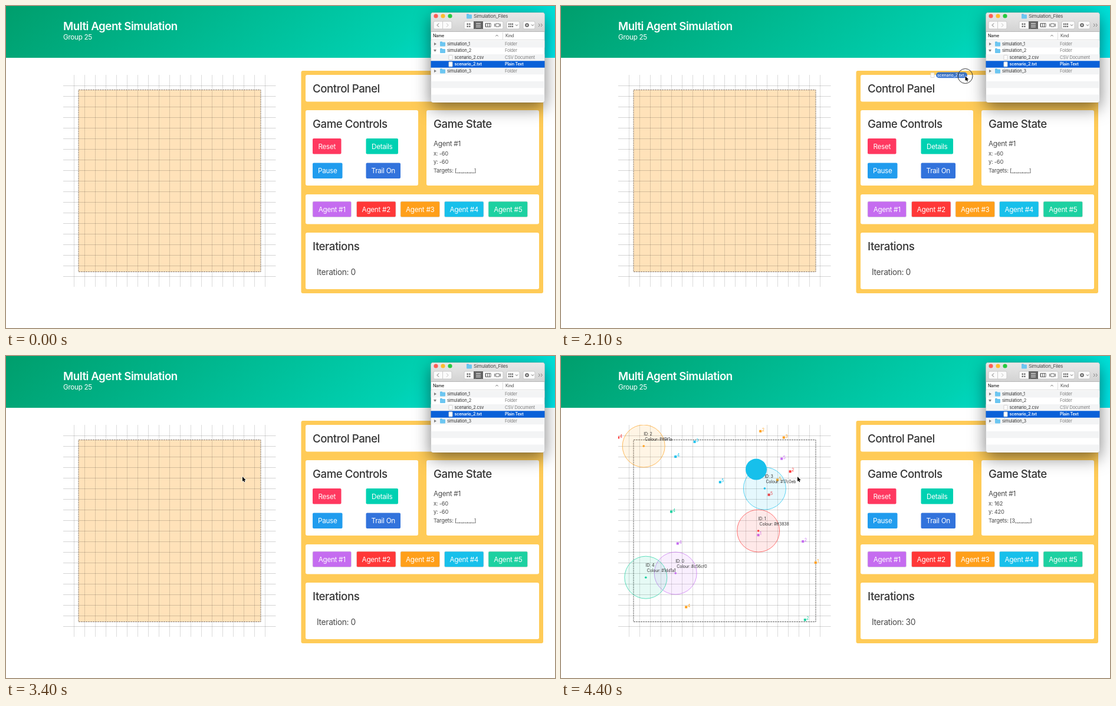
Animation of 931x547 px, one loop 4.5 s. Source, as an HTML page with a canvas:

```html
<!DOCTYPE html>
<html lang="en">
<head>
<meta charset="utf-8">
<title>Multi Agent Simulation</title>
<style>
html, body { margin: 0; width: 100%; height: 100%; overflow: hidden; background: #fff; }
header { position: absolute; width: 931px; height: 88px;
  background: linear-gradient(141deg, #009e6c 0%, #00d1b2 71%, #00e7eb 100%); }
canvas { position: absolute; left: 0; top: 0; }
</style>
</head>
<body>
<header></header>
<canvas id="stage" width="931" height="547"></canvas>
<script>
const ctx = document.getElementById('stage').getContext('2d');
const LOOP = 4500, STEP = 100;
const MAP = { x: 97, y: 117, size: 360, scale: 0.6 };
const RANGE = 60, SPEED = 6;
const COLOURS = ['#c56cf0', '#ff3838', '#ff9f1a', '#17c0eb', '#1dd1a1'];

// start x, start y, row to sweep
const AGENTS = [[60, 342, 420], [576, 300, 300], [192, 24, 60], [594, 180, 180], [258, 432, 420]];
// number, x, y for each agent
const TARGETS = [
  [[1, 396, 312], [2, 522, 330], [4, 168, 336], [5, 462, 96]],
  [[2, 486, 132], [3, 414, 330], [4, 0, 36], [5, 426, 198]],
  [[1, 558, 390], [2, 402, 18], [3, 468, 36], [4, 192, 516], [5, 450, 156]],
  [[1, 390, 126], [3, 216, 48], [4, 162, 90], [5, 288, 162]],
  [[1, 72, 390], [2, 528, 552], [4, 150, 246]]
];
// time, x, y of the pointer
const POINTER = [[400, 906, 172], [800, 855, 104], [1300, 853, 98], [1700, 814, 99],
  [2600, 525, 144], [3200, 401, 205], [4500, 401, 205]];

function text(str, x, y, size, colour, weight = 400, align = 'left') {
  ctx.font = `${weight} ${size}px Inter, Roboto, sans-serif`;
  ctx.letterSpacing = -0.025 * size + 'px';
  ctx.textAlign = align;
  ctx.fillStyle = colour;
  ctx.fillText(str, x, y);
}

function rect(x, y, w, h, colour, radius = 0, border) {
  ctx.beginPath();
  ctx.roundRect(x, y, w, h, radius);
  ctx.fillStyle = colour;
  ctx.fill();
  if (border) stroke(border);
}

function stroke(colour, width = 1) {
  ctx.strokeStyle = colour;
  ctx.lineWidth = width;
  ctx.stroke();
}

function line(points, colour, width = 1) {
  ctx.beginPath();
  points.forEach(([x, y]) => ctx.lineTo(x, y));
  stroke(colour, width);
}

function shape(points, colour) {
  ctx.beginPath();
  points.forEach(([x, y]) => ctx.lineTo(x, y));
  ctx.closePath();
  ctx.fillStyle = colour;
  ctx.fill();
}

function disc(x, y, r, colour) {
  ctx.beginPath();
  ctx.arc(x, y, r, 0, Math.PI * 2);
  ctx.fillStyle = colour;
  ctx.fill();
}

function button(label, x, y, w, colour, border) {
  rect(x, y, w, 26.5, colour, 2, border);
  text(label, x + w / 2, y + 17.6, 11.7, '#fff', 400, 'center');
}

// Go left to the margin, then to the row, then sweep right.
function agentAt([x, y, row], n) {
  let d = n * SPEED;
  if (d <= x - RANGE) return [x - d, y];
  d -= x - RANGE;
  const gap = Math.abs(row - y);
  if (d <= gap) return [RANGE, y + Math.sign(row - y) * d];
  return [RANGE + d - gap, row];
}

function foundAt(agent, [, x, y], last) {
  for (let n = 0; n <= last; n++) {
    const [ax, ay] = agentAt(agent, n);
    if (Math.hypot(ax - x, ay - y) < RANGE) return n;
  }
  return Infinity;
}

const toStage = (x, y) => [MAP.x + x * MAP.scale, MAP.y + y * MAP.scale];

function drawMap(loaded, n) {
  ctx.save();
  ctx.beginPath();
  ctx.rect(MAP.x, MAP.y, MAP.size + 0.5, MAP.size);
  ctx.clip();
  if (!loaded) rect(123, 142.5, 309, 309, 'rgba(255,159,26,.3)');
  for (let d = 18; d < MAP.size; d += 18) {
    const x = MAP.x + d + 0.5, y = MAP.y + d + 0.5;
    line([[x, MAP.y], [x, 477]], 'rgba(0,0,0,.14)');
    line([[MAP.x, y], [458, y]], 'rgba(0,0,0,.17)');
  }
  ctx.setLineDash([3, 1]);
  ctx.beginPath();
  ctx.rect(123, 142.5, 309, 309);
  stroke(loaded ? '#666' : '#8b8078');
  ctx.setLineDash([]);
  if (loaded) drawAgents(n);
  ctx.restore();
}

function drawAgents(n) {
  const flashes = [];
  TARGETS.forEach((list, id) => list.forEach(target => {
    const found = foundAt(AGENTS[id], target, n);
    const [x, y] = toStage(target[1], target[2]);
    if (found === n) flashes.push([x, y, 18, COLOURS[id]]);
    if (found <= n) return;
    rect(x - 2, y - 2, 4, 4, COLOURS[id]);
    text(target[0], x + 2.5, y, 7, COLOURS[id]);
  }));
  AGENTS.forEach((agent, id) => {
    const [x, y] = toStage(...agentAt(agent, n));
    disc(x, y, 36, COLOURS[id] + '1c');
    stroke(COLOURS[id] + 'b0');
    disc(x, y, 1.8, COLOURS[id]);
    text('ID: ' + id, x, y - 18, 7, '#333');
    text('Colour: ' + COLOURS[id], x + 2, y - 9, 7, '#333');
  });
  flashes.forEach(f => disc(...f));
}

function drawPanel(loaded, n) {
  const dark = '#363636', grey = '#4a4a4a';
  text('Multi Agent Simulation', 97, 41, 18.7, '#fff', 600);
  text('Group 25', 97, 56.5, 11.7, '#fff');
  rect(500.5, 110, 410.5, 378, '#ffcb57', 3);
  [[508, 117, 396, 45.5], [508, 177, 191, 128], [713, 177, 191, 128],
    [508, 320, 396, 50.5], [508, 385, 396, 96]].forEach(b => rect(...b, '#fff', 3));

  text('Control Panel', 520, 147, 18.7, dark, 500);
  text('Game Controls', 520, 207, 18.7, dark, 500);
  text('Game State', 725, 207, 18.7, dark, 500);
  text('Iterations', 520, 415, 18.7, dark, 500);
  text('Iteration: ' + n, 527, 456.5, 13.8, grey);

  button('Reset', 520, 225, 48.5, '#ff3860');
  button('Details', 610.5, 225, 54.5, '#00d1b2');
  button('Pause', 520, 266.5, 50.5, '#209cee');
  button('Trail On', 610.5, 266.5, 58.5, '#3273dc');
  COLOURS.forEach((c, i) => button('Agent #' + (i + 1), 520 + i * 74.5, 332, i ? 66.5 : 65.5, c, 'rgba(219,219,219,.7)'));

  const [x, y] = loaded ? agentAt(AGENTS[0], n) : [-60, -60];
  text('Agent #1', 725, 238, 11.7, grey);
  text('x: ' + x, 725, 254, 9.3, grey);
  text('y: ' + y, 725, 268.3, 9.3, grey);
  text(`Targets: [${loaded ? 3 : '_'},_,_,_,_]`, 725, 282.5, 9.3, grey);
}

function folder(x, y) {
  rect(x, y - 4, 4, 3, '#4fb4e6', 1);
  rect(x, y - 3, 9, 7, '#6cc6f1', 1);
}

function page(x, y) {
  rect(x, y - 4, 6, 8, '#fff', 0.5, '#d0d0d0');
}

function drawToolbar() {
  ['#ff5f57', '#ffbd2e', '#28c940'].forEach((c, i) => disc(729 + i * 12, 17, 3.6, c));
  folder(781, 17.5);
  text('Simulation_Files', 793, 20.3, 8.1, '#444');
  [[725, 31], [777, 66], [849, 22], [877, 20]].forEach(([x, w]) => rect(x, 26, w, 13, '#fbfbfb', 2, '#c9c9c9'));
  const icon = '#666';
  line([[740.5, 26], [740.5, 39]], '#ccc');
  line([[734, 29.5], [731, 32.5], [734, 35.5]], icon);
  line([[747, 29.5], [750, 32.5], [747, 35.5]], '#bbb');
  rect(793, 26, 16, 13, '#636363');
  for (let i = 0; i < 3; i++) {
    rect(797, 29 + i * 3, 8, 1, '#fff');
    line([[813.5 + i * 3, 30], [813.5 + i * 3, 35]], icon);
  }
  for (let i = 0; i < 6; i++) {
    const dx = i % 3 * 3, dy = i > 2 ? 4 : 0;
    if (i % 3 < 2) rect(781.5 + dx * 1.2, 29.5 + dy, 2.4, 2.4, icon);
    rect(852 + dx, 29.5 + dy, 2, 2.5, icon);
  }
  line([[813, 29.5], [822, 29.5], [822, 35.5], [813, 35.5], [813, 29.5]], icon);
  line([[828.5, 30], [828.5, 35]], icon);
  line([[838.5, 30], [838.5, 35]], icon);
  rect(830.5, 30, 6, 5, '#fff', 0, icon);
  disc(883.5, 32.5, 2.3, '#fff');
  stroke(icon, 2);
  for (const x of [864, 891]) line([[x, 31.5], [x + 2, 33.5], [x + 4, 31.5]], icon);
  for (const x of [903, 907]) line([[x, 30], [x + 2.5, 32.5], [x, 35]], '#777');
}

function drawRow([name, kind, inner, open], i, selected, lifted) {
  const y = 64.6 + i * 11.45;
  if (selected || lifted) rect(720.5, y - 5.6, 193, 11.4, selected ? '#0a60d8' : '#dcdcdc');
  const weight = selected ? 600 : 400;
  const size = selected ? 7.1 : 7.4;
  if (inner) page(751, y);
  else {
    const c = selected ? '#fff' : '#808080';
    shape(open ? [[725, y - 2], [730, y - 2], [727.5, y + 2]] : [[726, y - 2.5], [730, y], [726, y + 2.5]], c);
    folder(736, y);
  }
  text(name, inner ? 760.5 : 748, y + 2.4, size, selected ? '#fff' : '#333', weight);
  text(kind, 846, y + 2.4, size, selected ? '#fff' : '#808080', weight);
}

function drawFiles(overFolder) {
  ctx.save();
  ctx.shadowColor = 'rgba(0,0,0,.5)';
  ctx.shadowBlur = 28;
  ctx.shadowOffsetY = 9;
  rect(720.5, 11, 193, 153, '#fff', 4);
  ctx.restore();
  const bar = ctx.createLinearGradient(0, 11, 0, 43);
  bar.addColorStop(0, '#e9e9e9');
  bar.addColorStop(1, '#d3d3d3');
  rect(720.5, 11, 193, 32.5, bar, [4, 4, 0, 0]);
  line([[720.5, 43.5], [913.5, 43.5]], '#b8b8b8');
  drawToolbar();
  text('Name', 724, 53, 7, '#222', 500);
  text('Kind', 847, 53, 7, '#444');
  line([[830.5, 51.5], [832.5, 49], [834.5, 51.5]], '#777');
  line([[842.5, 45], [842.5, 57]], '#ddd');
  line([[720.5, 57.5], [913.5, 57.5]], '#ddd');
  for (let i = 0; i < 9; i += 2) rect(720.5, 59 + i * 11.45, 193, Math.min(11.45, 163 - 59 - i * 11.45), '#f3f4f5');
  [['simulation_1', 'Folder'], ['simulation_2', 'Folder', false, true],
    ['scenario_2.csv', 'CSV Document', true], ['scenario_2.txt', 'Plain Text', true],
    ['simulation_3', 'Folder']].forEach((row, i) =>
    drawRow(row, i, i === (overFolder ? 1 : 3), overFolder && i === 3));
  ctx.beginPath();
  ctx.roundRect(720.5, 11, 193, 153, 4);
  stroke('rgba(0,0,0,.18)', 0.7);
}

function pointerAt(t) {
  const i = POINTER.findIndex(p => p[0] >= t);
  const [t0, x0, y0] = POINTER[i - 1] || POINTER[0], [t1, x1, y1] = POINTER[i];
  const k = t1 > t0 ? (t - t0) / (t1 - t0) : 0;
  return [x0 + (x1 - x0) * k, y0 + (y1 - y0) * k];
}

function drawPointer(t) {
  if (t < 500) return;
  const [x, y] = pointerAt(t);
  if (t >= 1500 && t < 3300) {
    const k = Math.min(1, Math.max(0, (t - 1700) / 500));
    const left = x - 68 + 23 * k, mid = y - 2 * k;
    ctx.globalAlpha = 0.85;
    page(left - 9, mid);
    rect(left, mid - 4.8, 53, 9.6, '#1c62cc', 4.8);
    ctx.globalAlpha = 1;
    text('scenario_2.txt', left + 2, mid + 2.4, 7.2, '#fff');
  }
  if (t >= 1300 && t < 3300) {
    ctx.beginPath();
    ctx.arc(x, y, 12.5, 0, Math.PI * 2);
    stroke('#333');
  }
  const arrow = [[0, 0], [0, 8], [1.8, 6.4], [3, 9.2], [4.4, 8.6], [3.2, 5.9], [5.6, 5.8]].map(([a, b]) => [x + a, y + b]);
  line([...arrow, arrow[0]], '#fff', 1.2);
  shape(arrow, '#000');
}

function draw(now) {
  const t = Math.floor(now % LOOP / STEP) * STEP;
  const loaded = t >= 3500;
  const n = loaded ? (t - 3400) * 0.03 : 0;
  const iteration = Math.round(n);
  ctx.clearRect(0, 0, 931, 547);
  drawMap(loaded, iteration);
  drawPanel(loaded, iteration);
  drawFiles(t >= 1500 && t < 2000);
  drawPointer(t);
  requestAnimationFrame(draw);
}
requestAnimationFrame(draw);
</script>
</body>
</html>
```
